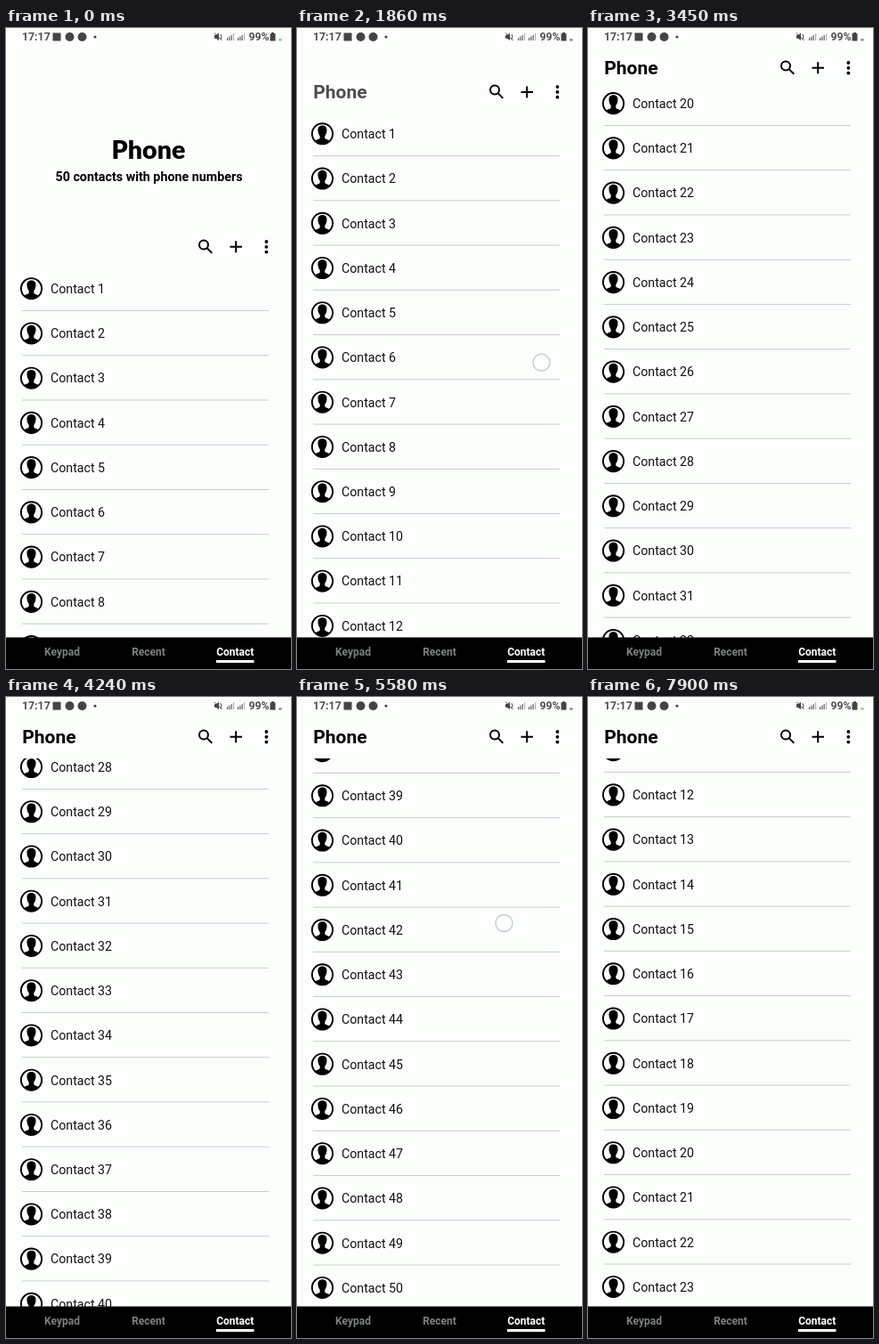
These frames come from a looping animation (320x720 px, 8 s). An HTML page:

```html
<!DOCTYPE html>
<html lang="en">
<head>
<meta charset="utf-8">
<style>
  html, body { margin: 0; width: 100%; height: 100%; overflow: hidden; background: #fbfefb; }
  svg { display: block; width: 320px; height: 720px; font-family: Roboto, sans-serif; }
  .bold { font-weight: 700; }
  .nav { font-size: 12px; text-anchor: middle; fill: #7c827e; }
  .status { font-size: 12.3px; font-weight: 700; fill: #505050; }
</style>
</head>
<body>
<svg viewBox="0 0 320 720">
  <defs>
    <g id="avatar">
      <circle r="11.6" fill="#fff" stroke="#000" stroke-width="1.9"/>
      <path d="M0-9.3C3.6-9.3 5.3-7 5-3.6 4.9-.8 3.7 1.2 2.8 2.6V5C4 6.5 7 6.6 8.4 8.3A11.8 11.8 0 0 1-8.4 8.3C-7 6.6-4 6.5-2.8 5V2.6C-3.7 1.2-4.9-.8-5-3.6-5.3-7-3.6-9.3 0-9.3Z"/>
    </g>
  </defs>

  <g id="list"></g>
  <rect id="cover" width="320" fill="#fbfefb"/>

  <g id="hero" text-anchor="middle" class="bold">
    <text x="160" y="147" font-size="28.6" font-weight="900" font-family="Lato, sans-serif">Phone</text>
    <text x="160.5" y="171.5" font-size="14.3">50 contacts with phone numbers</text>
  </g>

  <g id="bar">
    <text id="title" class="bold" x="18.3" y="7.3" font-size="21">Phone</text>
    <g fill="none" stroke="#000" stroke-width="2">
      <circle cx="222" cy="-2" r="5"/>
      <path d="M225.5 1.5L231.3 7.3M251.5 .3H265M258.2-6.2V6.8"/>
    </g>
    <circle cx="292.4" cy="-5.5" r="1.9"/>
    <circle cx="292.4" cy=".3" r="1.9"/>
    <circle cx="292.4" cy="6.1" r="1.9"/>
  </g>

  <g fill="#444">
    <text class="status" x="18" y="14">17:17</text>
    <rect x="52.5" y="5.5" width="9" height="9"/>
    <circle cx="71.5" cy="10" r="5"/>
    <circle cx="85.5" cy="10" r="5"/>
    <circle cx="100" cy="10" r="1.6"/>
    <path d="M234 8H236L239 5.5V14L236 11.8H234Z"/>
    <path d="M234 5.5L242.5 14M241 7Q243 10 241 12.5" fill="none" stroke="#444"/>
    <g id="signal">
      <path d="M248 11h1.2v3H248zM250.3 9.5h1.2V14h-1.2zM252.6 8h1.2v6h-1.2z" opacity=".85"/>
      <path d="M255 6h1.2v8H255z" opacity=".4"/>
    </g>
    <use href="#signal" x="12"/>
    <text class="status" x="272.5" y="14">99%</text>
    <path d="M298 5H301V6.2H302.5V14.5H296.5V6.2H298Z"/>
    <rect id="dot" x="306.3" y="12" width="3.2" height="2.6"/>
  </g>

  <rect y="684.5" width="320" height="36"/>
  <g class="nav bold">
    <text x="63" y="705.3">Keypad</text>
    <text x="160" y="705.3">Recent</text>
    <text x="257.3" y="705.3" fill="#fff">Contact</text>
  </g>
  <rect x="236" y="710" width="42.5" height="3" fill="#fff"/>

  <circle id="touch" r="9.5" fill="#fbfefb" fill-opacity=".6" stroke="#c9cdca" stroke-width="1.5"/>
</svg>
<script>
const LOOP = 8000, PITCH = 50.24, COLLAPSE = 201, END = 2091;
const el = id => document.getElementById(id);
const clamp = (v, lo = 0, hi = 1) => Math.min(hi, Math.max(lo, v));

// time (ms), scroll offset (px), velocity (px/ms)
const keys = [
  [250, 0, 0], [1860, 173.7, .2], [3450, 1162, .6], [4240, 1570.2, .45],
  [5480, END, .3], [6050, END, 0], [6250, 1850, -2.2], [6790, 1084.1, -.75],
  [7900, 735.6, -.1], [8000, 730, 0]
];

function scrollAt(t) {
  const i = keys.findIndex(k => k[0] > t);
  if (i < 1) return 0;
  const [t0, s0, v0] = keys[i - 1], [t1, s1, v1] = keys[i];
  if (s0 === s1) return s0;
  const d = t1 - t0, u = (t - t0) / d, w = 1 - u;
  const s = w * w * ((1 + 2 * u) * s0 + u * d * v0) + u * u * ((3 - 2 * u) * s1 - w * d * v1);
  return clamp(s, 0, END);
}

el('list').innerHTML = Array.from({ length: 50 }, (_, i) => {
  const y = 293 + i * PITCH;
  return `<use href="#avatar" x="28.5" y="${y - .3}"/>
    <text x="50" y="${y + 5}" font-size="14.2" fill="#111">Contact ${i + 1}</text>
    <rect x="18" y="${y + 24}" width="277" height="1" fill="#c9cdca"/>`;
}).join('');

function draw(t) {
  const s = scrollAt(t);
  const collapsed = Math.min(s, COLLAPSE);
  const barY = 245.5 - collapsed;
  const expanded = 1 - collapsed / COLLAPSE;
  el('list').setAttribute('transform', `translate(0 ${-s})`);
  el('cover').setAttribute('height', barY + 24.5);
  el('bar').setAttribute('transform', `translate(0 ${barY})`);
  el('title').setAttribute('opacity', (1 - clamp(expanded / .7)) ** 1.7);
  el('hero').setAttribute('opacity', clamp((expanded - .3) / .7) ** 1.7);
  el('hero').setAttribute('transform', `translate(0 ${-collapsed / 2})`);
  el('dot').setAttribute('fill', t < 100 || t >= 7900 ? '#7fd69a' : '#8d918e');

  const dragUp = t > 250 && t < 1990, dragDown = t > 5500 && t < 6250;
  const touch = el('touch');
  touch.setAttribute('visibility', dragUp || dragDown ? 'visible' : 'hidden');
  touch.setAttribute('cx', dragUp ? 274.5 : 232.5);
  touch.setAttribute('cy', dragUp ? 549.7 - s : 254 + END - s);
}

function tick() {
  draw(performance.now() % LOOP);
  requestAnimationFrame(tick);
}
tick();
</script>
</body>
</html>
```
